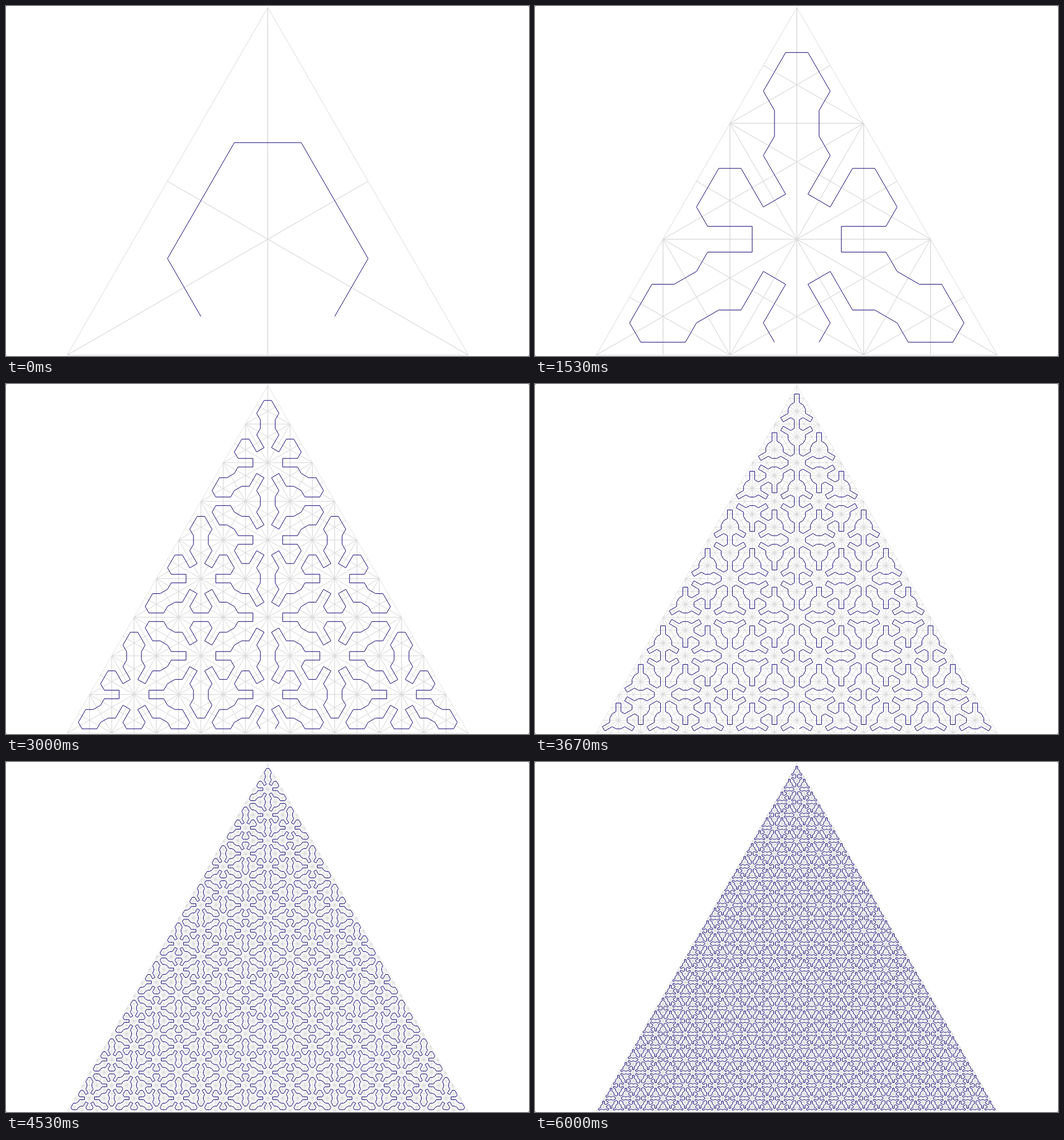
Write an HTML page with a canvas that moves like this. It is 915 by 612 pixels and loops after 6.07 s.

```html
<!DOCTYPE html>
<html lang="en">
<head>
<meta charset="utf-8">
<title>Space-filling curve on a triangle</title>
<style>
html, body { margin: 0; width: 100%; height: 100%; overflow: hidden; background: #fff; }
canvas { display: block; width: 915px; height: 612px; }
</style>
</head>
<body>
<canvas id="stage" width="915" height="612"></canvas>
<script>
const W = 915, H = 612, LOOP = 6070;
const STARTS = [0, 870, 1470, 2070, 2730, 3330, 4000, 4600];
const GRID_WIDTH = [1, 1, 1, 0.9, 0.8, 0.7, 0.6, 0.5];

const mix = (p, q, t) => [p[0] + (q[0] - p[0]) * t, p[1] + (q[1] - p[1]) * t];

// The six 30-60-90 triangles of an equilateral one, in visiting order.
function seed() {
  const side = 702, h = side * Math.sqrt(3) / 2, cx = 458, top = 2.5;
  const a = [cx, top], b = [cx - side / 2, top + h], c = [cx + side / 2, top + h];
  const o = [cx, top + h * 2 / 3];
  const ab = mix(a, b, 0.5), ac = mix(a, c, 0.5), bc = mix(b, c, 0.5);
  return [[b, bc], [b, ab], [a, ab], [a, ac], [c, ac], [c, bc]]
    .map(([sharp, right], i) => ({ sharp, wide: o, right, back: i % 2 === 1 }));
}

// Split into three similar triangles; the middle one is walked the other way.
function split({ sharp, wide, right, back }) {
  const foot = mix(right, sharp, 1 / 3), half = mix(wide, sharp, 0.5);
  const parts = [
    { sharp: wide, wide: foot, right, back },
    { sharp: wide, wide: foot, right: half, back: !back },
    { sharp, wide: foot, right: half, back }
  ];
  return back ? parts.reverse() : parts;
}

function paint(cells, level) {
  const layer = document.createElement("canvas");
  layer.width = W;
  layer.height = H;
  const g = layer.getContext("2d");
  g.fillStyle = "#fff";
  g.fillRect(0, 0, W, H);

  g.beginPath();
  for (const { sharp, wide, right } of cells) {
    g.moveTo(...sharp);
    g.lineTo(...wide);
    g.lineTo(...right);
    g.closePath();
  }
  g.lineWidth = GRID_WIDTH[level];
  g.strokeStyle = "#dadada";
  g.stroke();

  g.beginPath();
  for (const { sharp, wide, right } of cells) {
    g.lineTo((sharp[0] + wide[0] + right[0]) / 3, (sharp[1] + wide[1] + right[1]) / 3);
  }
  g.lineWidth = 1;
  g.strokeStyle = "#0c0070";
  g.stroke();

  g.fillStyle = "#555";
  for (const x of [0, W - 1]) for (const y of [0, H - 1]) g.fillRect(x, y, 1, 1);
  return layer;
}

const layers = [];
let cells = seed();
STARTS.forEach((_, level) => {
  if (level) cells = cells.flatMap(split);
  layers.push(paint(cells, level));
});

const ctx = document.getElementById("stage").getContext("2d");
let shown = -1;

function draw() {
  const t = performance.now() % LOOP;
  const level = STARTS.filter(s => s <= t).length - 1;
  if (level !== shown) {
    ctx.drawImage(layers[level], 0, 0);
    shown = level;
  }
  requestAnimationFrame(draw);
}
draw();
</script>
</body>
</html>
```
